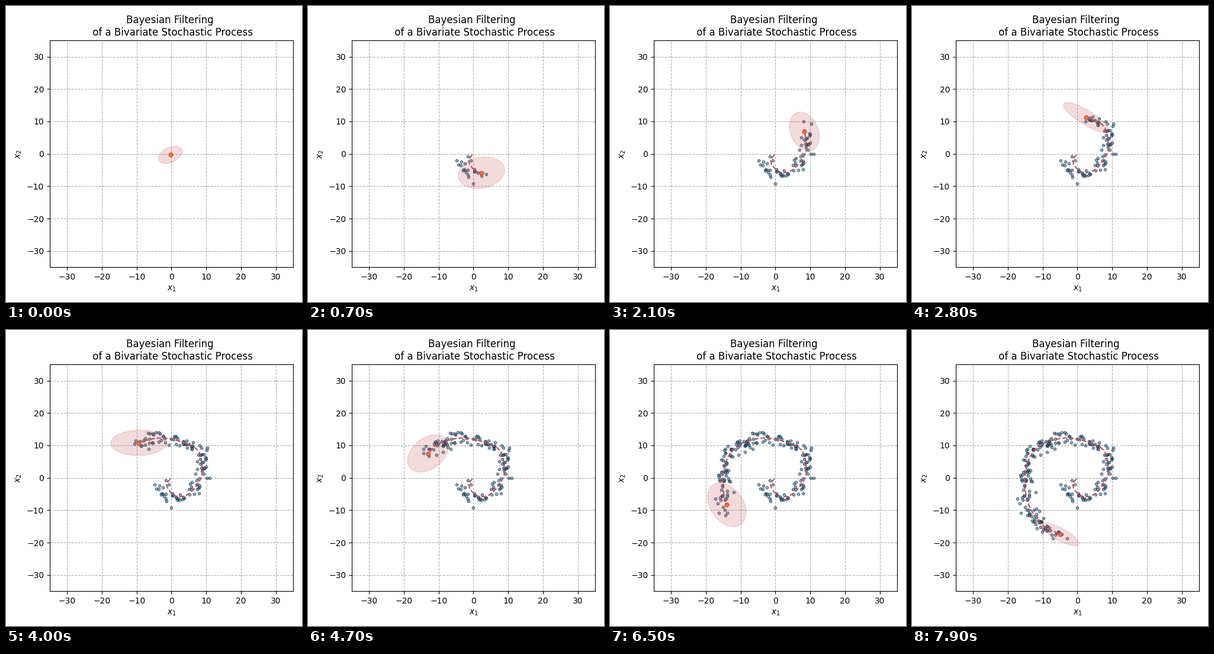
Recreate the animation shown at these times as a matplotlib script. Size 500x500 px, loop 8000 ms.

```python
import numpy as np
import matplotlib.pyplot as plt
from matplotlib.animation import FuncAnimation

FRAMES, INTERVAL, PER_STEP = 80, 100, 3
RED, ORANGE, BLUE, NAVY = "#c44e52", "#ff6430", "#2a6a96", "#001a30"

# Key states: step, mean x, mean y, region half width, half height, correlation
KEYS = np.array([
    (0, -.3, -.3, 3.4, 2.7, .4),
    (2, -1.4, -2.1, 5, 6, .4),
    (5, .5, -5.2, 5.9, 6.2, .2),
    (9, 4.3, -5.4, 7.2, 3.75, .2),
    (14, 8.5, -.1, 5.9, 7.4, .72),
    (18, 8.8, 3.8, 3.4, 6.7, .2),
    (23, 7.4, 8.7, 5.3, 5.5, -.55),
    (28, 2.5, 11.2, 6.5, 4.65, -.84),
    (33, -2.5, 12.3, 8, 4.2, -.4),
    (40, -9.4, 10.8, 8.05, 3.9, .03),
    (45, -12.2, 8.7, 6.5, 5.5, .3),
    (55, -15, 1.2, 4, 5.5, .4),
    (65, -14, -8.3, 5.55, 6.75, -.35),
    (72, -10.5, -14.2, 5.2, 6.15, -.6),
    (79, -5.1, -17.4, 5.5, 3.55, -.8)])


def smooth(t, k, y):
    """Cubic Hermite curve through the points (k, y)."""
    slope = np.gradient(y, k)
    j = np.clip(np.searchsorted(k, t, side="right") - 1, 0, len(k) - 2)
    h = k[j + 1] - k[j]
    s = (t - k[j]) / h
    return ((1 + 2 * s) * (1 - s)**2 * y[j] + s * (1 - s)**2 * h * slope[j]
            + s**2 * (3 - 2 * s) * y[j + 1] - s**2 * (1 - s) * h * slope[j + 1])


def correlate(u, v, spread):
    w, h, rho = spread
    return np.column_stack([w * u, h * (rho * u + np.sqrt(1 - rho**2) * v)])


def observe():
    """Noisy samples around each mean; the filter lags them at the start."""
    rng = np.random.default_rng(4)
    pts = []
    for i in range(1, FRAMES):
        u, v = np.clip(rng.normal(size=(2, PER_STEP)), -2, 2) / 3.7
        lag = 2.2 * np.exp(-i / 4)
        pts.append(mean[i] - lag + correlate(u, v, spread[i]))
    return np.concatenate(pts)


steps = np.arange(FRAMES)
state = np.column_stack([smooth(steps, KEYS[:, 0], y) for y in KEYS.T[1:]])
mean, spread = state[:, :2], state[:, 2:]
points = observe()
theta = np.linspace(0, 2 * np.pi, 121)

fig, ax = plt.subplots(figsize=(5, 5), dpi=100)
ax.set(xlim=(-35, 35), ylim=(-35, 35), xlabel="$x_1$", ylabel="$x_2$",
       xticks=range(-30, 31, 10), yticks=range(-30, 31, 10))
ax.set_title("Bayesian Filtering \n of a Bivariate Stochastic Process")
ax.grid(ls="--")
ax.set_axisbelow(True)
fig.tight_layout()

obs = ax.scatter([], [], s=10, c=BLUE, edgecolors=NAVY, linewidths=1,
                 alpha=.5, zorder=1)
region, = ax.fill([0, 1, 0], [0, 0, 1], color=RED, alpha=.2, zorder=1.5)
trail, = ax.plot([], [], "--", color=RED, lw=1.5, zorder=2)
tip, = ax.plot([], [], "o", ms=5, mfc=ORANGE, mec="#b8493a", mew=.8,
               alpha=.9, zorder=3)


def update(i):
    obs.set_offsets(points[:PER_STEP * i])
    region.set_xy(mean[i] + correlate(np.cos(theta), np.sin(theta), spread[i]))
    trail.set_data(*mean[:i + 1].T)
    tip.set_data(*mean[i:i + 1].T)
    return obs, region, trail, tip


anim = FuncAnimation(fig, update, frames=FRAMES, interval=INTERVAL,
                     repeat=True, repeat_delay=0)
plt.show()
```
